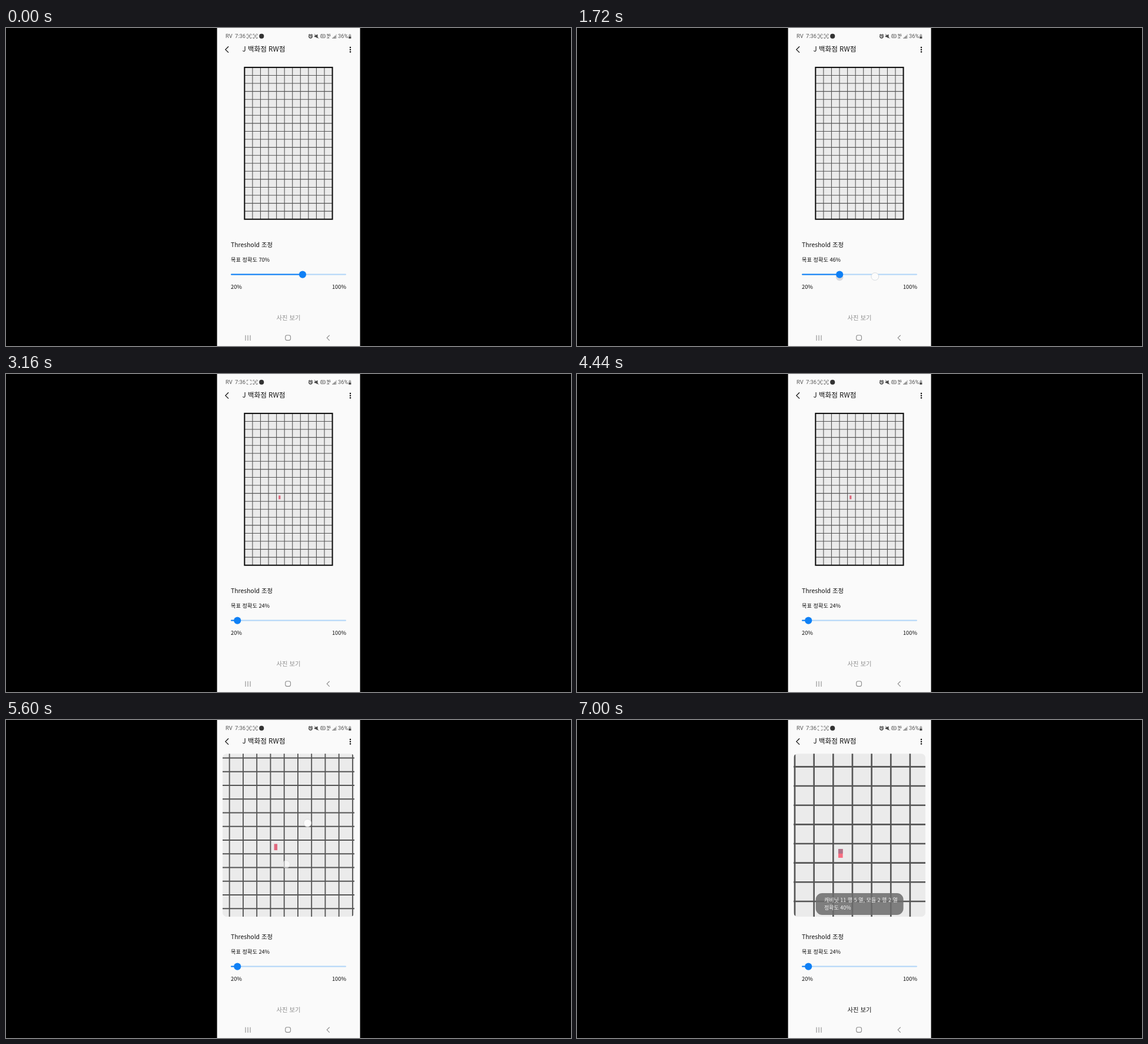
Animation, 960 px wide and 540 px high, one loop 7080 ms. Source, as an HTML page:

```html
<!DOCTYPE html>
<html lang="ko">
<head>
<meta charset="utf-8">
<title>Threshold</title>
<style>
  html, body { margin: 0; width: 100%; height: 100%; overflow: hidden; background: #000; }
  svg { display: block; width: 960px; height: 540px; }
  text { font-family: "Noto Sans CJK KR", "Noto Sans CJK", "Noto Sans", sans-serif; font-weight: 500; fill: #111; }
  .status text { font-family: Roboto, sans-serif; font-weight: 400; font-size: 9.4px; fill: #555; }
  .line { fill: none; stroke-linecap: round; stroke-linejoin: round; }
</style>
</head>
<body>
<svg viewBox="0 0 960 540">
  <defs>
    <clipPath id="view"><rect x="368" y="57.3" width="224" height="276.7" rx="7"/></clipPath>
    <path id="corners" d="M-3.6-1.8V-3.6H-1.8M1.8-3.6H3.6V-1.8M3.6 1.8V3.6H1.8M-1.8 3.6H-3.6V1.8"/>
    <g id="person"><circle cy="-.9" r="1.3"/><path d="M-2 2.2Q0-.4 2 2.2"/></g>
  </defs>
  <rect width="960" height="540"/>
  <rect x="358.6" width="243" height="540" fill="#fafafa"/>

  <g class="status">
    <text x="373" y="17.3" font-size="9">RV</text>
    <text x="389" y="17.3">7:36</text>
    <g class="line" stroke="#666" stroke-width=".8">
      <use href="#corners" x="413" y="14"/>
      <use id="blink" href="#person" x="413" y="14"/>
      <use href="#corners" x="423.5" y="14"/>
      <use href="#person" x="423.5" y="14"/>
    </g>
    <circle cx="434.2" cy="13.9" r="4.1" fill="#333"/>
    <g class="line" stroke="#444" stroke-width="1">
      <circle cx="517.5" cy="14.3" r="2.7" stroke-width="1.4"/>
      <path d="M514.4 11.6l1.4-1.2M520.6 11.6l-1.4-1.2M517.5 13v1.5h1"/>
      <path d="M525 13h1.6l2.4-2v6l-2.4-2H525z" fill="#444"/>
      <path d="M524.5 10.5l6.5 7" stroke-width=".9"/>
      <rect x="534.5" y="11" width="8" height="5.6" rx="1.5" stroke="#666" stroke-width=".9"/>
      <path d="M536.5 12.6v2.4M538.5 12.6v2.4M536.5 13.8h2M540.4 12.6v2.4" stroke="#666" stroke-width=".7"/>
      <path d="M546 15.6v2M548.5 15.6v2M546.8 17.4l1-1.8" stroke="#666" stroke-width=".8"/>
    </g>
    <text x="545" y="14.2" style="font-size:5.4px;font-weight:700">5G</text>
    <path d="M554.6 18v-1.6h1.2V18zM556.6 18v-3.2h1.2V18zM558.6 18v-5h1.2v5z" fill="#555"/>
    <path d="M560.4 18v-7.2h1.2V18z" fill="#aaa"/>
    <text x="564" y="17.3">36%</text>
    <path d="M582.3 11.2h1v-.9h2v.9h1v6.6h-4z" fill="#aaa"/>
    <path d="M582.3 14.8h4v3h-4z" fill="#444"/>
  </g>

  <path class="line" d="M377.7 31.8L372.8 36.6L377.7 41.4" stroke="#111" stroke-width="1.3"/>
  <text x="401.4" y="40.3" font-size="11.6">J 백화점 RW점</text>
  <g fill="#111"><circle cx="585" cy="32.9" r="1.25"/><circle cx="585" cy="36.7" r="1.25"/><circle cx="585" cy="40.5" r="1.25"/></g>

  <g clip-path="url(#view)">
    <g id="board">
      <rect width="11" height="19" fill="#ebebeb"/>
      <path id="grid" fill="none" stroke="#555" stroke-width=".08"/>
      <rect width="11" height="19" fill="none" stroke="#0c0c0c" stroke-width=".15"/>
      <rect id="mark" x="4.265" y="10.275" width=".235" height=".46"/>
      <rect id="picked" x="4.265" y="10.275" width=".235" height=".24" fill="#b0748a"/>
    </g>
  </g>

  <g id="toast">
    <rect x="405.6" y="294" width="149" height="37" rx="11" fill="#6d6d6d" fill-opacity=".86"/>
    <g font-size="9">
      <text x="420" y="309" style="fill:#f4f4f4;font-weight:400">캐비닛 11 행 5 열, 모듈 2 행 2 열</text>
      <text x="420" y="322.4" style="fill:#f4f4f4;font-weight:400">정확도 40%</text>
    </g>
  </g>

  <text x="382" y="372" font-size="10.4">Threshold 조정</text>
  <text id="goal" x="382" y="396.8" font-size="9.2"></text>
  <rect x="382" y="417.5" width="196" height="2" rx="1" fill="#b0d5f8"/>
  <rect id="fill" x="382" y="417.4" height="2.2" rx="1.1" fill="#0f80f5"/>
  <circle id="ghost" cx="506.3" cy="422" r="6.4" fill="#fcfcfc" stroke="#d3d8dc" stroke-width=".9"/>
  <circle id="finger" cy="422.8" r="6.4" fill="#c9c9cf" fill-opacity=".65"/>
  <circle id="thumb" cy="418.6" r="6.1" fill="#0f80f5"/>
  <text x="382" y="443.4" font-size="9.3">20%</text>
  <text x="578" y="443.4" font-size="9.3" text-anchor="end">100%</text>
  <text id="button" x="480" y="496.4" font-size="10.3" text-anchor="middle">사진 보기</text>

  <g fill="#fff" fill-opacity=".85" stroke="#d5d5d5" stroke-width=".7">
    <circle id="touchA" r="6.5"/>
    <circle id="touchB" r="6.5"/>
  </g>

  <g class="line" stroke="#8c8c8c" stroke-width="1.1">
    <path d="M407 522v8.4M411 522v8.4M415 522v8.4"/>
    <rect x="474.7" y="521.8" width="8.8" height="8.6" rx="2.8"/>
    <path d="M549.4 522L545.2 526.2L549.4 530.4"/>
  </g>
</svg>
<script>
  const LOOP = 7080;
  const $ = id => document.getElementById(id);
  const set = (id, attrs) => { for (const k in attrs) $(id).setAttribute(k, attrs[k]); };
  const ramp = (t, a, b) => Math.min(1, Math.max(0, (t - a) / (b - a)));
  const smooth = u => u * u * (3 - 2 * u);
  const mix = (a, b, u) => a.map((v, i) => v + (b[i] - v) * u);

  // Each pose: board x, y, cell size, then the two finger points
  const rest = [405.3, 66.9, 13.57, 505.5, 188, 483, 227];
  const half = [356.7, -28, 23.2, 512.3, 175, 476, 245];
  const near = [304.7, -116.5, 32.65, 517.5, 164, 469.5, 260];

  let lines = "";
  for (let c = 1; c < 11; c++) lines += `M${c} 0V19`;
  for (let r = 1; r < 19; r++) lines += `M0 ${r}H11`;
  set("grid", { d: lines });

  function pinch(t) {
    return t < 5600
      ? mix(rest, half, ramp(t, 5200, 5600) ** 1.4)
      : mix(half, near, 1 - (1 - ramp(t, 5600, 5860)) ** 1.4);
  }

  function draw(t) {
    const goal = Math.round(70 - 46 * smooth(ramp(t, 1310, 2110)));
    const x = 335.4 + 2.408 * goal;
    $("goal").textContent = `목표 정확도 ${goal}%`;
    set("fill", { width: x - 382 });
    set("thumb", { cx: x });
    set("finger", { cx: x, opacity: ramp(t, 1220, 1300) * (1 - ramp(t, 2200, 2320)) });
    set("ghost", { opacity: ramp(t, 1400, 1520) * (1 - ramp(t, 1960, 2080)) });

    const [bx, by, cell, ax, ay, cx, cy] = pinch(t);
    set("board", { transform: `matrix(${cell} 0 0 ${cell} ${bx} ${by})` });
    set("mark", { opacity: goal <= 40 ? 1 : 0, fill: cell > 28 ? "#f86e82" : "#df687d" });
    const shown = ramp(t, 5120, 5200), gone = 1 - ramp(t, 5860, 6000);
    set("touchA", { cx: ax, cy: ay, opacity: shown * gone });
    set("touchB", { cx, cy, opacity: shown * gone * .65 });

    const tapped = t >= 6760;
    set("picked", { opacity: tapped ? 1 : 0 });
    set("button", { style: `fill:${tapped ? "#111" : "#8d8d8d"}` });
    set("toast", { opacity: ramp(t, 6760, 6960) });
    set("blink", { opacity: Math.abs(t % 920 - 480) < 230 ? 0 : 1 });
  }

  const start = performance.now();
  function tick() {
    draw((performance.now() - start) % LOOP);
    requestAnimationFrame(tick);
  }
  tick();
</script>
</body>
</html>
```
